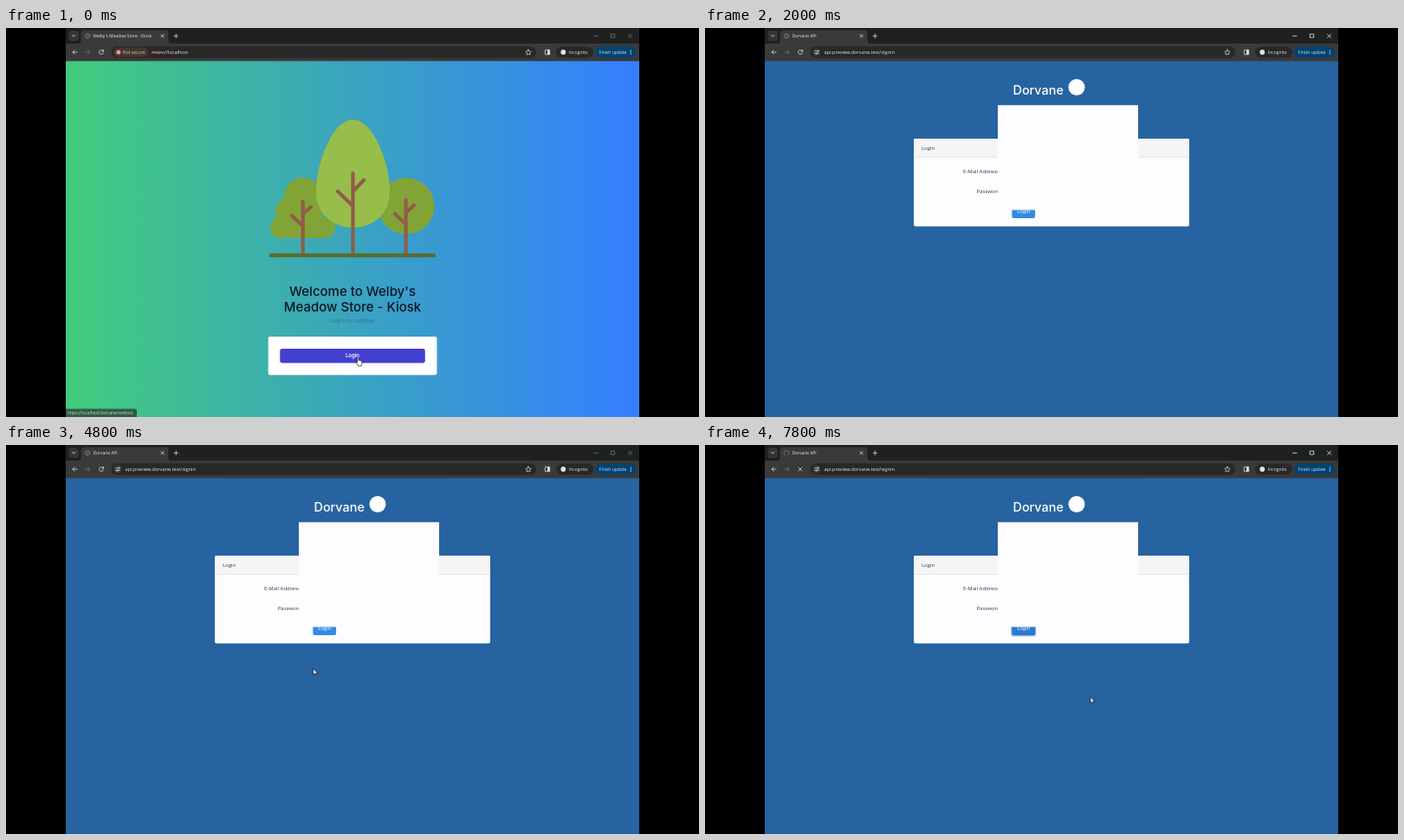
Recreate the animation shown at these times as an HTML page. Size 800x450 px, loop 8 s.

```html
<!DOCTYPE html>
<html lang="en">
<head>
<meta charset="utf-8">
<title>Kiosk login</title>
<style>
  html, body { margin: 0; width: 100%; height: 100%; overflow: hidden; background: #000; }
  svg { display: block; width: 100vw; height: 100vh; }
  .ui { font-family: "Open Sans", "Noto Sans", sans-serif; fill: #e6e6e6; }
  .page { font-family: Inter, Roboto, sans-serif; }
  .form { font-family: "Open Sans", "Noto Sans", sans-serif; font-size: 6px; fill: #333840; }
  .line { fill: none; stroke-linecap: round; stroke-linejoin: round; }
</style>
</head>
<body>
<svg viewBox="0 0 800 450" xmlns="http://www.w3.org/2000/svg">
  <defs>
    <linearGradient id="sky">
      <stop offset="0.02" stop-color="#42cb7f"/>
      <stop offset="0.5" stop-color="#3aa4bf"/>
      <stop offset="1" stop-color="#347fff"/>
    </linearGradient>
    <clipPath id="stage"><rect x="69" width="662" height="450"/></clipPath>
  </defs>
  <rect width="800" height="450"/>
  <g clip-path="url(#stage)">

    <g id="kiosk" class="page">
      <rect x="69" y="38" width="662" height="412" fill="url(#sky)"/>
      <g fill="#82a437">
        <circle cx="343" cy="195" r="22"/>
        <circle cx="329" cy="213" r="18"/>
        <rect x="330" y="195" width="35" height="40"/>
        <rect x="305" y="219" width="75" height="24" rx="12"/>
        <circle cx="462" cy="206" r="32.5"/>
      </g>
      <path fill="#97bd4b" d="M400.5 106C424 106 443 156 443 189C443 215 424 231 400.5 231S358 215 358 189C358 156 377 106 400.5 106Z"/>
      <path class="line" stroke="#8f5d48" stroke-width="4.2" d="M400.5 168V261M400.5 206L383 189M400.5 189L413 176
        M342.7 201V261M342.7 229L330 217M342.7 215L352 207
        M461.6 199V261M461.6 227L449 215M461.6 214L471 205"/>
      <path class="line" stroke="#596d2d" stroke-width="4.4" d="M306 263H494"/>
      <g text-anchor="middle">
        <g font-size="15" font-weight="500" fill="#0c1522">
          <text x="400" y="310">Welcome to Welby's</text>
          <text x="400" y="327.5">Meadow Store - Kiosk</text>
        </g>
        <text x="400" y="340.6" font-size="6" fill="#416b81">Log in to continue</text>
        <rect x="303" y="357.8" width="195" height="44.4" rx="2.5" fill="#17445a" opacity=".18"/>
        <rect x="302.7" y="357" width="194.8" height="44.4" rx="2.2" fill="#fff"/>
        <rect x="316.3" y="371" width="167.5" height="16.4" rx="2.6" fill="#433fcf"/>
        <text x="400" y="381.3" font-size="6" font-weight="600" fill="#fff">Login</text>
      </g>
      <g id="status">
        <path d="M69 440.5H149Q151 440.5 151 442.5V450H69Z" fill="#303234"/>
        <text class="ui" x="71" y="447.2" font-size="4.8">https://localhost/dorvane/redirect</text>
      </g>
    </g>

    <g id="signin">
      <rect x="69" y="38" width="662" height="412" fill="#2763a0"/>
      <text class="page" x="355.5" y="77" font-size="14.4" font-weight="500" fill="#fff">Dorvane</text>
      <circle cx="429" cy="68.5" r="9.5" fill="#fff"/>
      <rect x="241" y="128" width="318" height="101.4" rx="2" fill="#fdfcff"/>
      <path d="M241 149.5V130Q241 128 243 128H557Q559 128 559 130V149.5Z" fill="#f5f5f7"/>
      <path d="M241 149.5H559" stroke="#dedee2" stroke-width=".7"/>
      <rect x="354.3" y="158" width="143" height="16.2" rx="2" fill="#fff" stroke="#a5cfd9" stroke-width="1"/>
      <rect x="354.3" y="181" width="143" height="16" rx="2" fill="#fff" stroke="#d7dbe2" stroke-width=".8"/>
      <path d="M360.3 163V169" stroke="#444" stroke-width=".6"/>
      <rect id="ring" x="353.2" y="203" width="29" height="18.4" rx="3" fill="#8cbdf0"/>
      <rect id="button" x="354.3" y="204.2" width="26.8" height="15.9" rx="2"/>
      <g id="labels" class="form">
        <text x="250" y="140.8">Login</text>
        <text x="298" y="168">E-Mail Address</text>
        <text x="313.7" y="191.2">Password</text>
        <text x="367.8" y="214.4" text-anchor="middle" fill="#fff">Login</text>
      </g>
    </g>

    <g class="ui">
      <rect x="69" width="662" height="18" fill="#1f2020"/>
      <rect x="69" y="18" width="662" height="20.3" fill="#3a3a3a"/>
      <path d="M83 18Q86.500 18 86.500 14.500V6Q86.500 2.500 90 2.500H184Q187.500 2.500 187.500 6V14.500Q187.500 18 191 18Z" fill="#3a3a3a"/>
      <rect x="72.500" y="3" width="11.500" height="12" rx="3.500" fill="#343535"/>
      <path class="line" stroke="#ddd" stroke-width=".9" d="M76.500 8.200L78.200 9.900L79.900 8.200"/>
      <g id="globe" class="line" stroke="#858585" stroke-width=".7">
        <circle cx="94" cy="9.300" r="2.700"/><path d="M92 7.600L94.500 9.500L93.500 11.500M95 7L96.300 9.300"/>
      </g>
      <path id="spinner" class="line" stroke="#a9b5c0" stroke-width=".8" d="M94 6.400A2.900 2.900 0 1 1 91.100 9.300"/>
      <text id="tab" x="100.500" y="11.100" font-size="4.900"></text>
      <g class="line" stroke="#ddd" stroke-width=".8">
        <path d="M179 7.500L182.200 10.700M182.200 7.500L179 10.700M194 9.200H198.600M196.300 6.900V11.500"/>
        <path d="M82 28H77M79.300 25.700L77 28L79.300 30.300"/>
        <path stroke="#777" d="M92 28H97M94.700 25.700L97 28L94.700 30.300"/>
        <path id="reload" d="M112.300 26.800A2.500 2.500 0 1 0 112.500 28.700M112.600 25.200V27H110.800"/>
        <path id="stop" d="M108 26L112 30M112 26L108 30"/>
      </g>
      <g id="controls" class="line" stroke="#eee" stroke-width=".8">
        <path d="M678.700 9.300H683M718.500 7.100L722.700 11.300M722.700 7.100L718.500 11.300"/>
        <rect x="698.700" y="7" width="4" height="4"/>
      </g>

      <rect x="121.500" y="21.300" width="490.500" height="13.400" rx="6.700" fill="#282828"/>
      <g id="insecure">
        <rect x="124" y="22.600" width="40" height="10.800" rx="5.400" fill="#433733"/>
        <circle cx="129.800" cy="28" r="2.500" fill="#ee9a80"/>
        <text x="134.800" y="29.900" font-size="5.100" fill="#f2b9a6">Not secure</text>
        <text x="168.300" y="30" font-size="5.500"><tspan fill="#ee8f80">https</tspan>://localhost</text>
        <path d="M168 28.300H182.500" stroke="#ee8f80" stroke-width=".6"/>
      </g>
      <g id="secure">
        <circle cx="129" cy="28" r="4.500" fill="#3a3a3a"/>
        <path class="line" stroke="#ddd" stroke-width=".7" d="M126.700 26.700H128.500M130.300 29.400H131.500M126.700 29.400H128.200"/>
        <g class="line" stroke="#ddd" stroke-width=".7"><circle cx="130.300" cy="26.700" r=".9"/><circle cx="128.700" cy="29.400" r=".9"/></g>
        <text x="137.600" y="30" font-size="5.600">api.preview.dorvane.test/signin</text>
      </g>
      <path class="line" stroke="#ddd" stroke-width=".7" d="M603 24.900L604 27L606.200 27.300L604.600 28.800L605 31L603 29.900L601 31L601.400 28.800L599.800 27.300L602 27Z"/>
      <rect x="622.300" y="25.300" width="5.400" height="5.400" rx=".5" fill="none" stroke="#ddd" stroke-width=".8"/>
      <rect x="625" y="25.300" width="2.700" height="5.400" fill="#ddd"/>
      <rect x="635" y="21.500" width="43" height="13" rx="6.500" fill="#282828"/>
      <circle cx="643.300" cy="28" r="2.900" fill="#e3e3e3"/>
      <text x="649.800" y="29.900" font-size="5">Incognito</text>
      <rect x="680" y="21.500" width="47.500" height="13" rx="6.500" fill="#06426f"/>
      <text x="684.800" y="29.900" font-size="5" fill="#c6e5fb">Finish update</text>
      <g fill="#c6e5fb"><circle cx="721.300" cy="25.800" r=".65"/><circle cx="721.300" cy="28" r=".65"/><circle cx="721.300" cy="30.200" r=".65"/></g>
    </g>

    <g id="cursor" fill="#fff" stroke="#111" stroke-width=".7" stroke-linejoin="round">
      <path id="arrow" d="M0 0V7L1.600 5.600L2.700 8L3.800 7.500L2.700 5.200H4.900Z"/>
      <path id="hand" d="M1.200 6V1Q2 -.2 2.800 1V4Q4 3.500 4.500 4.300Q6 4.200 6.400 5.500V8Q6 9 5.600 10.500H2.300Q1.500 8.800 -.4 6.700Q.1 5.500 1.200 6.600Z"/>
    </g>
    <rect id="mask" x="338" y="89.300" width="162" height="121.200" fill="#fdfcff"/>
  </g>
</svg>
<script>
const LOOP = 8000, STEP = 200;
const $ = id => document.getElementById(id);
const show = (id, on) => $(id).setAttribute("display", on ? "inline" : "none");
const within = (t, from, to) => t >= from && t < to;

// time, x, y of the pointer tip
const path = [
  [0, 404.5, 380.5], [800, 404.5, 380.5], [1000, 323, 207.5], [1200, 294.5, 178.5],
  [1600, 362, 164], [4400, 356, 200], [4600, 352, 236], [4800, 354.7, 258.7],
  [5400, 411, 215], [6600, 411, 215], [7000, 370, 212.5], [7200, 370, 212.5], [7800, 445, 291.5]
];

function pointerAt(t) {
  const next = path.findIndex(p => p[0] > t);
  if (next < 0) return path[path.length - 1].slice(1);
  const [t0, x0, y0] = path[next - 1], [t1, x1, y1] = path[next];
  const k = (t - t0) / (t1 - t0);
  return [x0 + (x1 - x0) * k, y0 + (y1 - y0) * k];
}

function render(time) {
  const t = Math.floor((time % LOOP) / STEP) * STEP;
  const signin = t >= 1200;
  const clicked = t >= 7200;
  const loading = within(t, 1200, 1600) || clicked;
  const active = within(t, 1200, 4400) || t >= 7000;

  show("kiosk", !signin);
  show("insecure", !signin);
  show("signin", signin);
  show("secure", signin);
  show("labels", t >= 1400);
  show("mask", t >= 1600);
  show("ring", clicked);
  show("globe", !loading);
  show("spinner", loading);
  show("reload", !loading);
  show("stop", loading);
  show("hand", t < 1000);
  show("arrow", t >= 1000);

  $("tab").textContent = signin ? "Dorvane API" : "Welby's Meadow Store - Kiosk";
  $("button").setAttribute("fill", clicked ? "#2b78cc" : "#368ae2");
  $("status").setAttribute("opacity", t < 200 ? 0.72 : 1);
  $("controls").setAttribute("opacity", active ? 1 : 0.42);
  $("spinner").setAttribute("opacity", clicked ? 0.5 : 1);
  $("spinner").setAttribute("transform", `rotate(${(t - 1200) * 0.36} 94 9.3)`);
  $("cursor").setAttribute("transform", `translate(${pointerAt(t)})`);
}

const start = performance.now();
function tick() {
  render(performance.now() - start);
  requestAnimationFrame(tick);
}
tick();
</script>
</body>
</html>
```
